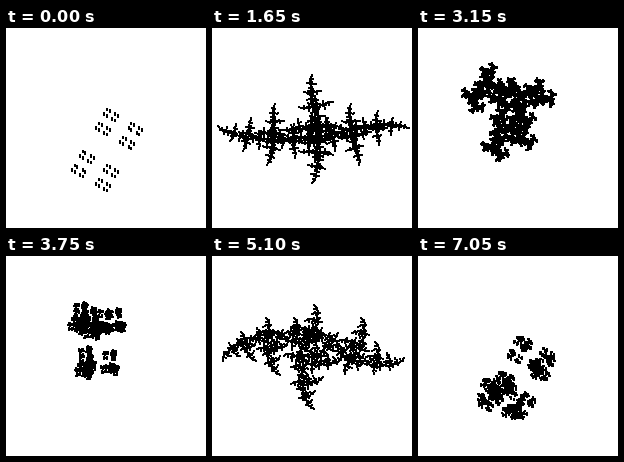
Animation of 200x200 px, one loop 7.2 s. Source, as an HTML page with a canvas:

```html
<!DOCTYPE html>
<html>
<head>
<meta charset="utf-8">
<style>
html, body { margin: 0; width: 100%; height: 100%; overflow: hidden; background: #fff; }
canvas { display: block; width: 200px; height: 200px; image-rendering: pixelated; }
</style>
</head>
<body>
<canvas id="stage" width="200" height="200"></canvas>
<script>
const ctx = document.getElementById('stage').getContext('2d');
const STEPS = 48, STEP_MS = 150, DEPTH = 7, DOT = 2;
const SCALE = 1 / Math.sqrt(3), RADIUS = 42, CENTER = 100;
const QUARTER = Math.PI / 2;

// Similarity z -> SCALE e^(i turn) z + shift e^(i dir)
function similarity(turn, shift, dir) {
  const a = SCALE * Math.cos(turn), b = SCALE * Math.sin(turn);
  const cx = shift * Math.cos(dir), cy = shift * Math.sin(dir);
  return (x, y) => [a * x - b * y + cx, b * x + a * y + cy];
}

function draw(step) {
  const angle = step / STEPS * 2 * Math.PI;
  const maps = [
    similarity(-QUARTER, 0, 0),
    similarity(QUARTER + angle, RADIUS, QUARTER - angle),
    similarity(QUARTER - angle, RADIUS, QUARTER + angle)
  ];
  let points = [[0, 0]];
  for (let i = 0; i < DEPTH; i++) {
    points = maps.flatMap(map => points.map(([x, y]) => map(x, y)));
  }
  ctx.fillStyle = '#fff';
  ctx.fillRect(0, 0, 200, 200);
  ctx.fillStyle = '#000';
  for (const [x, y] of points) {
    ctx.fillRect(Math.round(CENTER + x), Math.round(CENTER + y), DOT, DOT);
  }
}

const start = performance.now();
let shown = -1;
function tick() {
  const step = Math.floor((performance.now() - start) / STEP_MS) % STEPS;
  if (step !== shown) draw(shown = step);
  requestAnimationFrame(tick);
}
tick();
</script>
</body>
</html>
```
